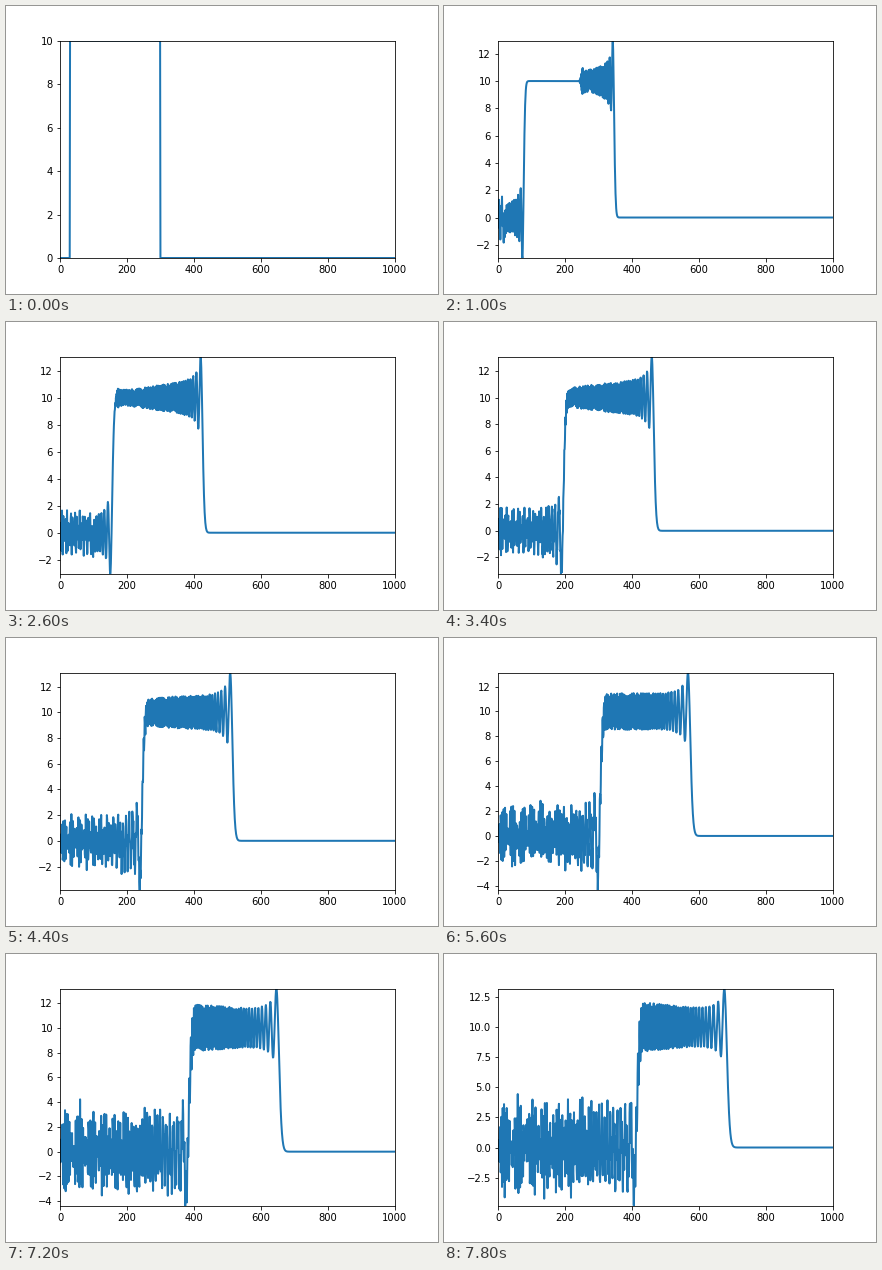
These frames come from a looping animation (432x288 px, 8000 ms). A matplotlib script:

```python
import numpy as np
import matplotlib.pyplot as plt
from matplotlib.animation import FuncAnimation

# Advection of a box pulse: forward Euler in time, central differences in space
N = 1000
DT = 0.01
STEPS = 1000      # Euler steps per frame
FRAMES = 40
INTERVAL = 200    # ms


def solve():
    u = np.zeros(N + 1)
    u[30:300] = 10
    states = [u.copy()]
    for _ in range(FRAMES - 1):
        for _ in range(STEPS):
            u[1:-1] -= 0.5 * DT * (u[2:] - u[:-2])
        states.append(u.copy())
    return states


states = solve()

plt.rcParams["font.family"] = "DejaVu Sans"
fig = plt.figure(figsize=(6, 4), dpi=72, facecolor="white")
fig.subplots_adjust(left=0.125, right=0.9, bottom=0.125, top=0.88)
ax = fig.add_subplot()
ax.set_xlim(0, N)
line, = ax.plot(np.arange(N + 1), states[0], color="#1f77b4", lw=2)


def update(i):
    u = states[i]
    line.set_ydata(u)
    ax.set_ylim(u.min(), u.max())
    return line,


anim = FuncAnimation(fig, update, frames=FRAMES, interval=INTERVAL,
                     init_func=lambda: update(0), repeat=True, repeat_delay=0)
plt.show()
```
